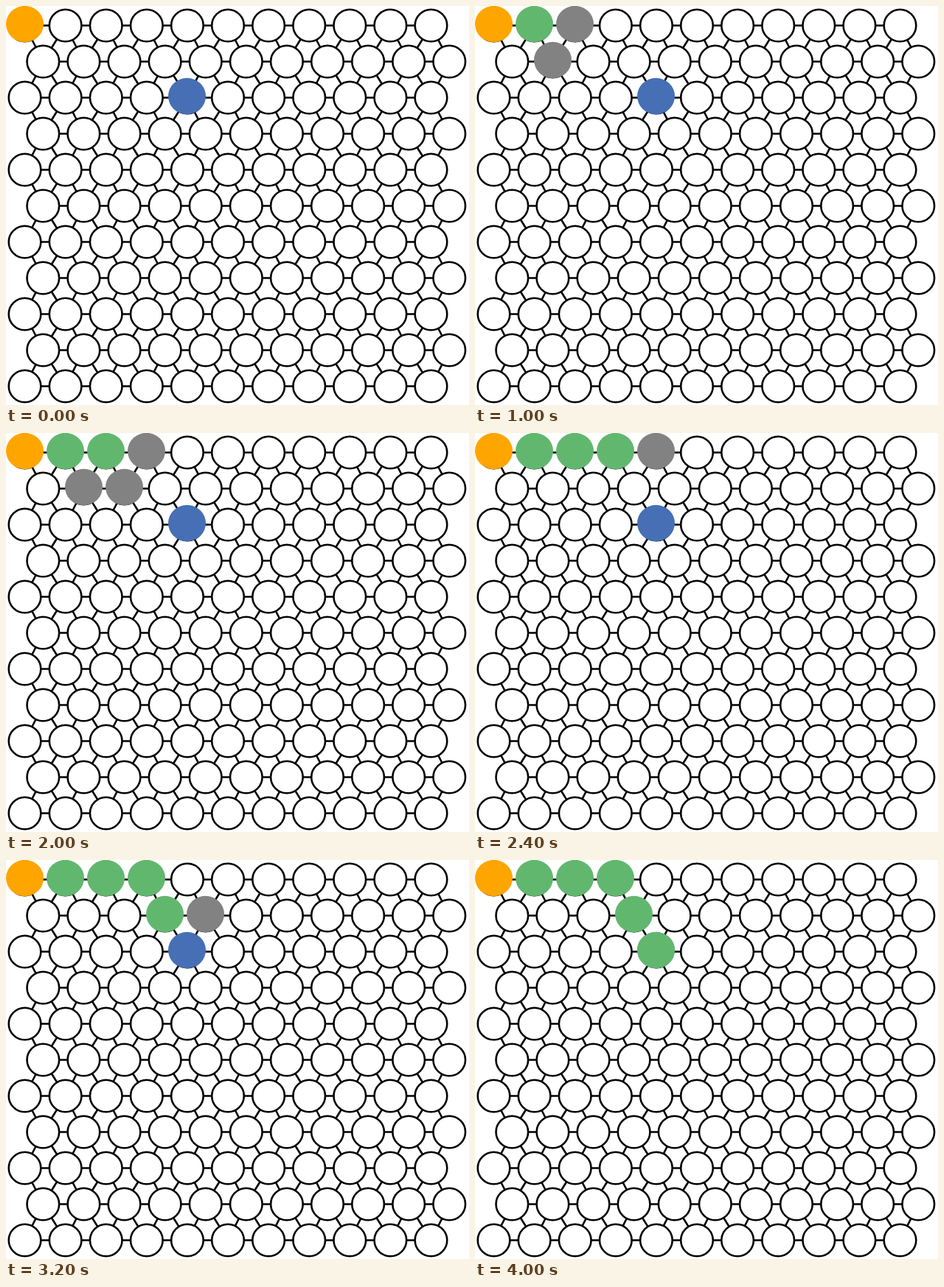
An HTML page for the animation above (4.2 s loop, 628 px wide and 542 px high).

```html
<!DOCTYPE html>
<html lang="en">
<head>
<meta charset="utf-8">
<title>Grid path search</title>
<style>
  html, body { margin: 0; width: 100%; height: 100%; overflow: hidden; background: #fff; }
  svg { display: block; width: 628px; height: 542px; }
  #nodes, #links { fill: #fff; stroke: #000; stroke-width: 2.6; }
</style>
</head>
<body>
<svg viewBox="0 0 628 542">
  <path id="links"/>
  <g id="nodes"></g>
  <g id="discs"></g>
</svg>
<script>
const SIZE = 11, STEP = 200, STEPS = 21;
const ORANGE = '#ffa500', BLUE = '#466fb5', GREEN = '#62b76f', GREY = '#828282';

const $ = id => document.getElementById(id);
const add = (parent, tag, attrs) => {
  const el = document.createElementNS('http://www.w3.org/2000/svg', tag);
  for (const k in attrs) el.setAttribute(k, attrs[k]);
  return parent.appendChild(el);
};

const nodeX = (r, c) => 25.5 + 55.1 * c + (r % 2 ? 24.8 : 0);
const nodeY = r => 26.5 + 49 * r;

let path = '';
const link = (r, c, r2, c2) => {
  if (r2 < SIZE && c2 >= 0 && c2 < SIZE)
    path += `M${nodeX(r, c)} ${nodeY(r)}L${nodeX(r2, c2)} ${nodeY(r2)}`;
};
for (let r = 0; r < SIZE; r++) {
  for (let c = 0; c < SIZE; c++) {
    link(r, c, r, c + 1);
    link(r, c, r + 1, c);
    link(r, c, r + 1, c + (r % 2 ? 1 : -1));
    add($('nodes'), 'circle', { cx: nodeX(r, c), cy: nodeY(r), r: 21.8 });
  }
}
$('links').setAttribute('d', path);

const addDisc = (r, c, fill) => add($('discs'), 'ellipse', {
  cx: 25.5 + 55 * c + (r % 2 ? 25 : 0), cy: 24.5 + 49 * r, rx: 25.5, ry: 24.7, fill
});

// Each round probes cells one by one, then keeps the chosen one: [row, column].
const rounds = [
  { probes: [[0, 1], [1, 0]], pick: [0, 1] },
  { probes: [[0, 2], [1, 1], [1, 0]], pick: [0, 2] },
  { probes: [[0, 3], [1, 2], [1, 1]], pick: [0, 3] },
  { probes: [[0, 4], [1, 3], [1, 2]], pick: [1, 3] },
  { probes: [[1, 4], [2, 3], [1, 2], [0, 4]], pick: [2, 4] }
];

addDisc(0, 0, ORANGE);
addDisc(2, 4, BLUE);

const spans = [];
let step = 1;
for (const { probes, pick } of rounds) {
  const end = step + probes.length;
  probes.forEach((cell, i) => spans.push({ el: addDisc(...cell, GREY), from: step + i, to: end }));
  spans.push({ el: addDisc(...pick, GREEN), from: end, to: STEPS });
  step = end + 1;
}

const start = performance.now();
function draw(now) {
  const s = Math.floor(Math.max(0, now - start) / STEP) % STEPS;
  for (const { el, from, to } of spans)
    el.setAttribute('visibility', s >= from && s < to ? 'visible' : 'hidden');
  requestAnimationFrame(draw);
}
draw(start);
</script>
</body>
</html>
```
